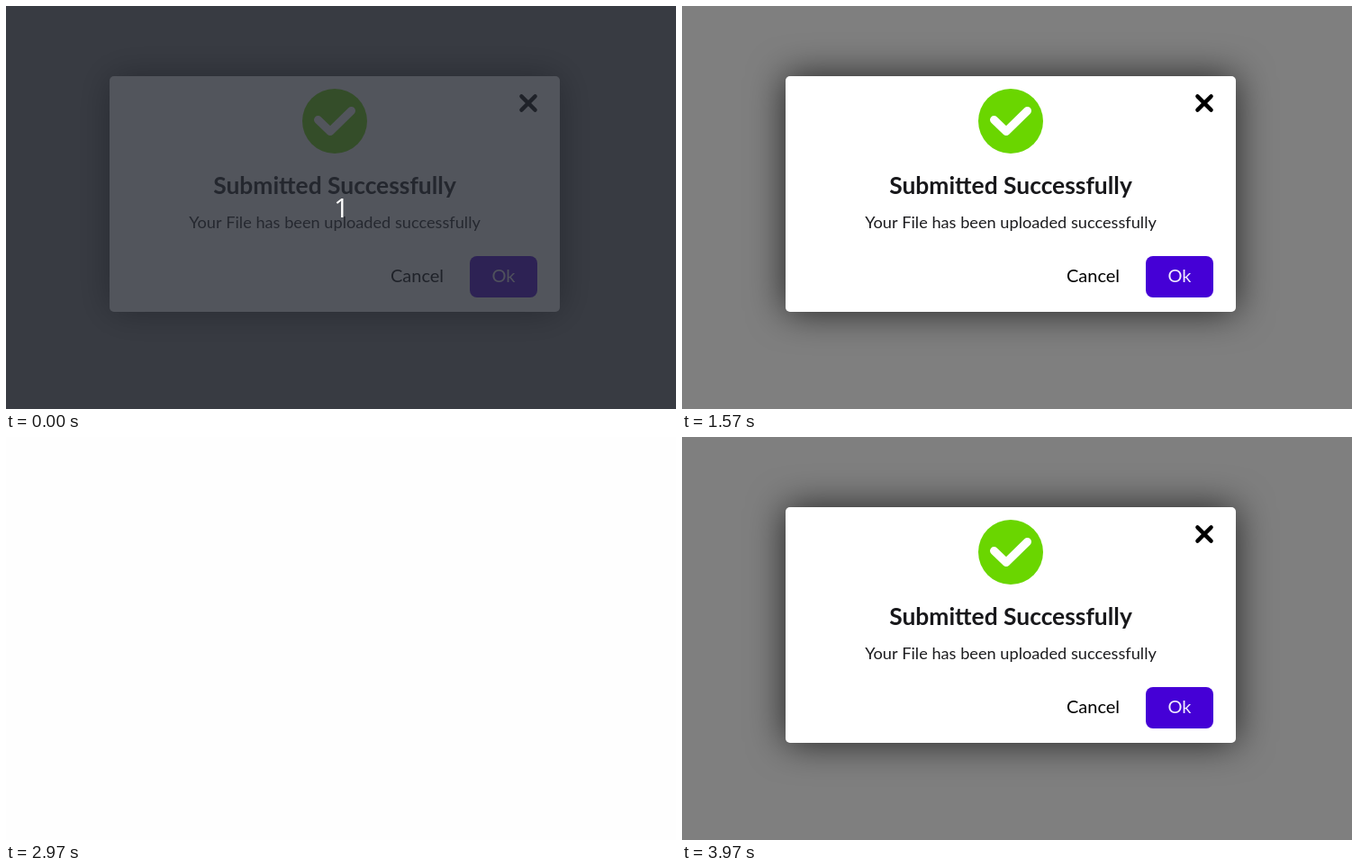
Write an HTML page with a canvas that moves like this. It is 744 px wide and 448 px high and loops after 4.01 s.

```html
<!DOCTYPE html>
<html lang="en">
<head>
<meta charset="utf-8">
<title>Submitted Successfully</title>
<style>
  html, body { margin: 0; width: 100%; height: 100%; overflow: hidden; background: #fefefe; }
  canvas { display: block; }
</style>
</head>
<body>
<canvas id="stage" width="744" height="448"></canvas>
<script>
const W = 744, H = 448, LOOP = 4010;
const ctx = document.getElementById('stage').getContext('2d');

// Each run: when the page turns grey, when the dialog's clock began, when the page blanks.
const runs = [
  { from: 800, start: 714, to: 1800 },
  { from: 2030, start: 2002, to: 2970 },
  { from: 3200, start: 3182, to: LOOP }
];
const BOX = { w: 500, h: 262, x: 365, y: 209 };
const POP = 500, FONT_WAIT = 200, TICK_WAIT = 232, TICK = 540;

const webLook = {
  title: ['bold 26.4px Lato, sans-serif', 0],
  note: ['18.2px Lato, sans-serif', 38],
  button: '20px Lato, sans-serif',
  cancelX: 91.5, okLeft: 150, icon: { y: -81, r: 36 }
};
const plainLook = {
  title: ['bold 25.8px "Liberation Serif", serif', 0],
  note: ['15.8px "DejaVu Sans", sans-serif', 35],
  button: '18px "DejaVu Sans", sans-serif',
  cancelX: 95, okLeft: 157, icon: { y: -77.4, r: 29.3 }
};

const clamp = x => Math.min(1, Math.max(0, x));

// cubic-bezier(.25, .1, .25, 1)
function ease(x) {
  if (x <= 0 || x >= 1) return clamp(x);
  let lo = 0, hi = 1;
  for (let i = 0; i < 24; i++) {
    const s = (lo + hi) / 2, u = 1 - s;
    if (.75 * s * u * u + .75 * s * s * u + s * s * s < x) lo = s; else hi = s;
  }
  const u = 1 - lo;
  return .3 * lo * u * u + 3 * lo * lo * u + lo ** 3;
}

function text(str, font, x, y, color) {
  ctx.font = font;
  ctx.fillStyle = color;
  ctx.textAlign = 'center';
  ctx.fillText(str, x, y);
}

function line(points, width, color) {
  ctx.beginPath();
  points.forEach(([x, y]) => ctx.lineTo(x, y));
  ctx.lineWidth = width;
  ctx.strokeStyle = color;
  ctx.lineCap = ctx.lineJoin = 'round';
  ctx.stroke();
}

function boxPath(p) {
  let rx = BOX.w * (1 - p) + 5 * p, ry = BOX.h * (1 - p) + 5 * p;
  const fit = Math.min(1, BOX.w / 2 / rx, BOX.h / 2 / ry);
  const path = new Path2D();
  path.roundRect(-BOX.w / 2, -BOX.h / 2, BOX.w, BOX.h, { x: rx * fit, y: ry * fit });
  return path;
}

function shadow(path, p) {
  ctx.save();
  const outside = new Path2D();
  outside.rect(-1e5, -1e5, 2e5, 2e5);
  outside.addPath(path);
  ctx.clip(outside, 'evenodd');
  ctx.shadowColor = `rgba(0,0,0,${.72 * p})`;
  ctx.shadowBlur = 40 * p * p;
  ctx.fillStyle = '#000';
  // Cast from far off stage so only the shadow lands here.
  ctx.shadowOffsetX = 3000;
  const m = ctx.getTransform();
  ctx.setTransform(m.a, m.b, m.c, m.d, m.e - 3000, m.f);
  ctx.fill(path);
  ctx.restore();
}

function icon({ y, r }, tick) {
  ctx.save();
  ctx.translate(0, y);
  ctx.fillStyle = '#6ad600';
  ctx.beginPath();
  ctx.arc(0, 0, r, 0, 2 * Math.PI);
  ctx.fill();
  if (tick > 0) {
    ctx.scale(tick, tick);
    line([[-18.5, -1.5], [-5, 11.5], [18.5, -11.5]], 9, '#fff');
  }
  ctx.restore();
}

function dialog(p, tick, look) {
  if (p <= 0) return;
  ctx.save();
  ctx.translate(BOX.x, BOX.y);
  ctx.rotate(Math.PI * (1 - p));
  ctx.scale(p, p);
  const path = boxPath(p);
  shadow(path, p);
  ctx.fillStyle = `rgba(255,255,255,${1 - (1 - p) ** .66})`;
  ctx.fill(path);
  ctx.clip(path);

  icon(look.icon, tick);
  line([[207.4, -108.6], [222.6, -93.4]], 4.4, '#000');
  line([[222.6, -108.6], [207.4, -93.4]], 4.4, '#000');
  text('Submitted Successfully', look.title[0], 0, look.title[1], '#18181b');
  text('Your File has been uploaded successfully', look.note[0], 0, look.note[1], '#1c1c1f');
  text('Cancel', look.button, look.cancelX, 98, '#000');

  ctx.fillStyle = '#4500d6';
  ctx.beginPath();
  ctx.roundRect(look.okLeft, 69, 225 - look.okLeft, 46, 8);
  ctx.fill();
  text('Ok', look.button, (look.okLeft + 225) / 2, 98, '#f2ecff');
  ctx.restore();
}

function fill(color) {
  ctx.fillStyle = color;
  ctx.fillRect(0, 0, W, H);
}

function draw(t) {
  if (t < 470) {
    fill('#7f7f7f');
    dialog(1, 1, webLook);
    if (t < 300) {
      fill('rgba(39,43,52,.8)');
      text('1', '30px "Open Sans", sans-serif', 372.5, 235, '#fff');
    }
    return;
  }
  const run = runs.find(r => t >= r.from && t < r.to);
  if (!run) return fill('#fefefe');
  fill('#7f7f7f');
  const age = t - run.from;
  if (age < 35) return;
  const tick = 1 - (1 - clamp((age - TICK_WAIT) / TICK)) ** 3.2;
  dialog(ease((t - run.start) / POP), tick, age < FONT_WAIT ? plainLook : webLook);
}

const began = performance.now();
function tickFrame() {
  draw((performance.now() - began) % LOOP);
  requestAnimationFrame(tickFrame);
}
tickFrame();
</script>
</body>
</html>
```
